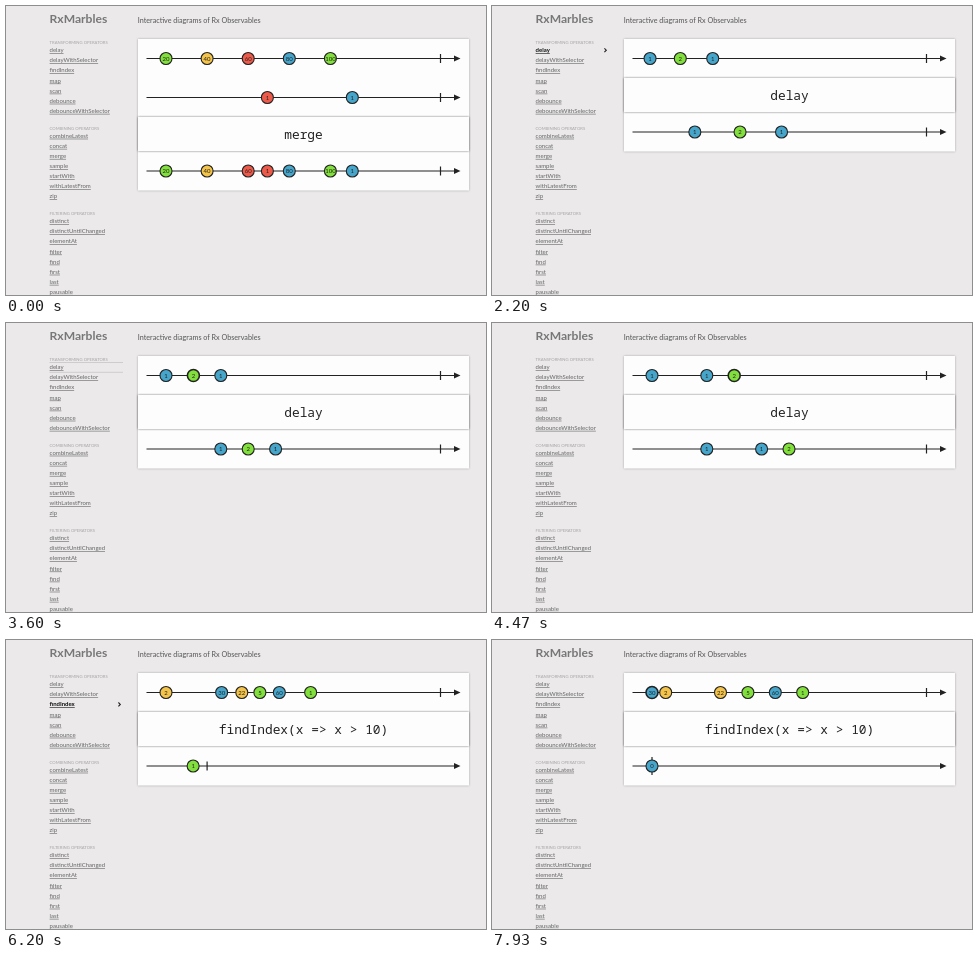
An HTML page that plays this animation: 480 by 289 pixels, repeating every 8000 ms.

```html
<!DOCTYPE html>
<html lang="en">
<head>
<meta charset="utf-8">
<title>RxMarbles</title>
<style>
  html, body { margin: 0; width: 100%; height: 100%; overflow: hidden; background: #ebe9ea; }
  svg { display: block; width: 100%; height: 100%; font-family: Lato, "Open Sans", sans-serif; }
  .logo { font-size: 12.1px; font-weight: 700; fill: #777; }
  .intro { font-size: 7.2px; fill: #555; }
  .head { font-size: 4.2px; fill: #a5a3a4; }
  .link { font-size: 6px; fill: #666; text-decoration: underline; }
  .link.on { fill: #111; font-weight: 700; }
  .op { font: 12.85px "Noto Sans Mono", "DejaVu Sans Mono", monospace; fill: #222; text-anchor: middle; }
  .card { fill: #fefdfe; filter: drop-shadow(0 .6px 1px rgba(0, 0, 0, .3)); }
  .box { fill: #fefdfe; filter: drop-shadow(0 .7px 1.1px rgba(0, 0, 0, .55)); }
  .axis { stroke: #222; stroke-width: 1.2; }
  .marble circle { stroke: #222; stroke-width: 1.1; }
  .marble.held circle { stroke-width: 1.6; }
  .marble text { font-size: 6px; fill: #222; text-anchor: middle; }
</style>
</head>
<body>
<svg id="stage" viewBox="0 0 480 289" preserveAspectRatio="none"></svg>
<script>
const LOOP = 8000, OPEN_DELAY = 2000, OPEN_FIND = 6140;
const COLORS = { g: '#82e03c', y: '#f4c34a', r: '#ee5a4a', b: '#45a5cb' };
const MENU = [
  ['TRANSFORMING', 'delay delayWithSelector findIndex map scan debounce debounceWithSelector'],
  ['COMBINING', 'combineLatest concat merge sample startWith withLatestFrom zip'],
  ['FILTERING', 'distinct distinctUntilChanged elementAt filter find first last pausable']
];

const stage = document.getElementById('stage');
const links = {};

function add(parent, tag, attrs, text) {
  const el = document.createElementNS('http://www.w3.org/2000/svg', tag);
  for (const key in attrs) el.setAttribute(key, attrs[key]);
  if (text !== undefined) el.textContent = text;
  return parent.appendChild(el);
}
const show = (el, on) => el.setAttribute('display', on ? 'inline' : 'none');
const timeX = units => 160 + 2.74 * units;
const clamp = v => Math.max(0, Math.min(1, v));
const smooth = v => { v = clamp(v); return v * v * (3 - 2 * v); };
const mix = (a, b, p) => a + (b - a) * p;
const settle = (ms, tau) => 1 - Math.exp(-Math.max(0, ms) / tau);

function axis(parent, y) {
  add(parent, 'path', { class: 'axis', d: `M140.5 ${y}H450` });
  add(parent, 'path', { fill: '#222', d: `M448 ${y - 3}L454.5 ${y}L448 ${y + 3}Z` });
  const tick = add(parent, 'path', { class: 'axis' });
  return (x, half = 4.5) => tick.setAttribute('d', `M${x} ${y - half}v${2 * half}`);
}

function marble(parent, y, label, color, units) {
  const g = add(parent, 'g', { class: 'marble' });
  const circle = add(g, 'circle', { r: 6 });
  const text = add(g, 'text', { y: 2.1 });
  const item = {
    g, home: timeX(units),
    move(x) { g.setAttribute('transform', `translate(${x.toFixed(2)} ${y})`); },
    dress(label, color) {
      text.textContent = label;
      circle.setAttribute('fill', COLORS[color]);
    }
  };
  item.dress(label, color);
  item.move(item.home);
  return item;
}

// Each row holds marbles as [label, color, time].
function page(title, inputs, output) {
  const g = add(stage, 'g', {});
  const top = 33 + 39 * inputs.length;
  add(g, 'rect', { class: 'card', x: 132, y: 33, width: 331, height: top + 40.5 }).setAttribute('height', top + 73.5 - 33);
  const row = (items, y) => {
    const tick = axis(g, y);
    tick(434.5);
    return { tick, items: items.map(m => marble(g, y, ...m)) };
  };
  const rows = inputs.map((items, i) => row(items, 52.5 + 39 * i));
  add(g, 'rect', { class: 'box', x: 132, y: top, width: 331, height: 34 });
  add(g, 'text', { class: 'op', x: 297.5, y: top + 21.5 }, title);
  return { g, rows, out: row(output, top + 54) };
}

add(stage, 'rect', { width: 480, height: 289, fill: '#ebe9ea' });
add(stage, 'text', { class: 'logo', x: 43.6, y: 17 }, 'RxMarbles');
add(stage, 'text', { class: 'intro', x: 131.8, y: 17 }, 'Interactive diagrams of Rx Observables');
MENU.forEach(([head, names], i) => {
  const y = 85.5 * i;
  add(stage, 'text', { class: 'head', x: 43.6, y: 38 + y }, head + ' OPERATORS');
  names.split(' ').forEach((name, j) => {
    links[name] = add(stage, 'text', { class: 'link', x: 43.6, y: 46.2 + y + 10.1 * j }, name);
  });
});
const chevron = add(stage, 'path', { d: 'M-.9 -1.9L1 0L-.9 1.9', fill: 'none', stroke: '#222', 'stroke-width': 1.1 });
const rules = add(stage, 'path', { d: 'M43.5 39.5H117M43.5 49.3H117', stroke: '#c2c0c1', 'stroke-width': .7 });

const first = [['20', 'g', 0], ['40', 'y', 15], ['60', 'r', 30], ['80', 'b', 45], ['100', 'g', 60]];
const second = [['1', 'r', 37], ['1', 'b', 68]];
const merge = page('merge', [first, second], [...first, ...second]);
const delay = page('delay',
  [[['1', 'b', 0], ['1', 'b', 20], ['2', 'g', 10]]],
  [['1', 'b', 20], ['1', 'b', 40], ['2', 'g', 30]]);
const find = page('findIndex(x => x > 10)',
  [[['2', 'y', 5], ['30', 'b', 15], ['22', 'y', 25], ['5', 'g', 35], ['60', 'b', 45], ['1', 'g', 55]]],
  [['1', 'g', 15]]);

function glide(items, starts, p) {
  items.forEach((m, i) => m.move(mix(starts[i], m.home, p)));
}

function drawDelay(t) {
  const p = settle(t - OPEN_DELAY, 132);
  const input = delay.rows[0].items, output = delay.out.items;
  glide(input, [151, 242, 191.5], p);
  glide(output, [160, 361, 269], p);
  const shift = timeX(20) - timeX(0);
  const drag = shift * smooth((t - 3680) / 720);
  if (drag > 0) {
    input[2].move(input[2].home + drag);
    output[2].move(output[2].home + drag);
  }
  input[2].g.classList.toggle('held', t > 3500 && t < 4750);
}

function drawFind(t) {
  const p = settle(t - OPEN_FIND, 168);
  const input = find.rows[0].items, result = find.out.items[0];
  glide(input, [154, 222, 239, 253, 269, 302], p);
  const drag = smooth((t - 7560) / 340);
  const x = mix(input[1].home, timeX(0), drag);
  if (drag > 0) input[1].move(x);
  input[1].g.classList.toggle('held', t > 7480);
  const leads = x < input[0].home;
  const resultX = drag > 0 ? x : mix(181, result.home, p);
  result.dress(leads ? '0' : '1', leads ? 'b' : 'g');
  result.move(resultX);
  find.out.tick(x, Math.abs(x - resultX) < 7 ? 9 : 4.5);
}

function draw(t) {
  show(merge.g, t < OPEN_DELAY);
  show(delay.g, t >= OPEN_DELAY && t < OPEN_FIND);
  show(find.g, t >= OPEN_FIND);
  if (t >= OPEN_FIND) drawFind(t);
  else if (t >= OPEN_DELAY) drawDelay(t);

  const hover = t > 1860 && t < 3000 ? 'delay' : t > 5600 && t < 6900 ? 'findIndex' : '';
  for (const name of ['delay', 'findIndex']) links[name].classList.toggle('on', name === hover);
  show(chevron, hover);
  chevron.setAttribute('transform', `translate(113.3 ${hover === 'delay' ? 44.2 : 64.4})`);
  show(rules, t > 3000 && t < 3665);
}

function tick(now) {
  draw(now % LOOP);
  requestAnimationFrame(tick);
}
draw(0);
requestAnimationFrame(tick);
</script>
</body>
</html>
```
